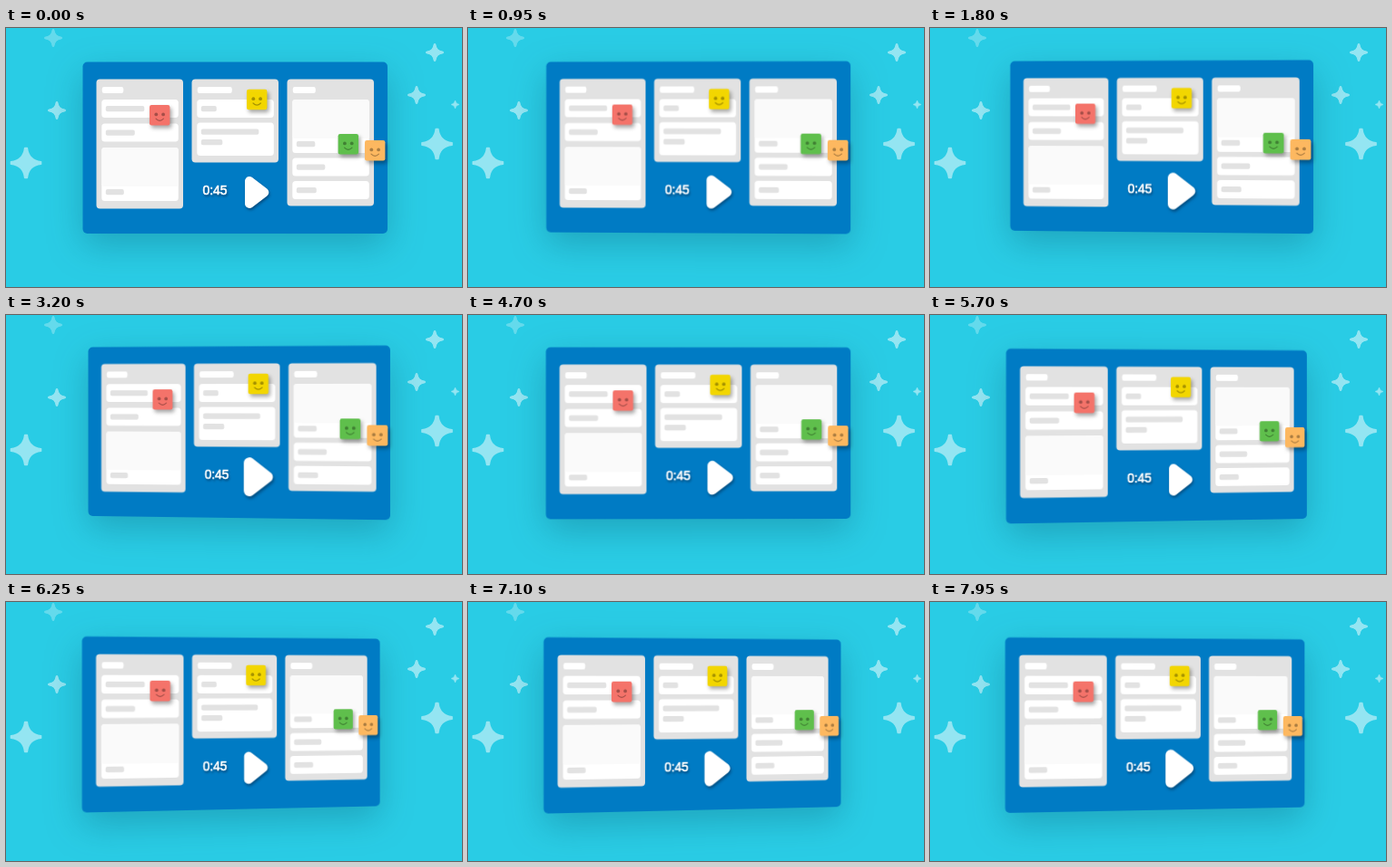
Write an HTML page that moves like this. It is 502x286 px and loops after 8000 ms.

```html
<!DOCTYPE html>
<html lang="en">
<head>
<meta charset="utf-8">
<title>Tilting board</title>
<style>
  html, body { margin: 0; width: 100%; height: 100%; overflow: hidden; background: #29cce5; }
  body { perspective: 1400px; perspective-origin: 252px 90px; }
  svg { position: absolute; left: 0; top: 0; width: 502px; height: 286px; overflow: visible; }
  #sky { fill: #fff; stroke: #fff; stroke-width: .1; stroke-linejoin: round; }
  #board { transform-origin: 252.25px 132.25px; }
  .base { fill: #007bc4; filter: drop-shadow(0 13px 19px rgba(0, 60, 80, .27)); }
  .panel, .pill { fill: #e2e2e2; }
  .card { fill: #fff; }
  .cover { fill: #fafafa; }
  .face { filter: drop-shadow(2px 3px 2px rgba(0, 0, 0, .35)); }
  .ink { fill: rgba(0, 0, 0, .32); }
  .smile { fill: none; stroke: rgba(0, 0, 0, .32); stroke-width: 1.1; stroke-linecap: round; }
  #play { fill: #fff; stroke: #fff; stroke-width: 10; stroke-linejoin: round;
          filter: drop-shadow(1.5px 2.5px 1.5px rgba(0, 30, 60, .5)); }
  text { font: 14px "Liberation Sans", Arial, sans-serif; fill: #fff; stroke: #fff; stroke-width: .6;
         filter: drop-shadow(1px 2px 1px rgba(0, 30, 60, .5)); }
</style>
</head>
<body>
<svg id="sky"></svg>
<svg id="board"></svg>
<script>
const LOOP = 8;
const sky = document.getElementById('sky');
const board = document.getElementById('board');

// --- Sky: stars fade out towards the top edge
const star = (x, y, r) =>
  `<path transform="translate(${x} ${y}) scale(${r})" opacity="${Math.min(.5, y / 40)}"
    d="M-.07-.94H.07Q.16-.16 .94-.07V.07Q.16 .16 .07 .94H-.07Q-.16 .16-.94 .07V-.07Q-.16-.16-.07-.94Z"/>`;

sky.innerHTML =
  star(22, 149, 17.5) + star(474.5, 128, 17.5) +
  star(56, 91, 10) + star(52, 11, 10) + star(452, 74, 10) + star(472, 27, 10) +
  star(494.5, 84.5, 4.5);

// --- Board
const box = (kind, x, y, w, h, r) =>
  `<rect class="${kind}" x="${x}" y="${y}" width="${w}" height="${h}" rx="${r}"/>`;

// Stacks cards down a column; each card lists the widths of its pills
function panel(column, gap, titleWidth, cards) {
  const x = 99.5 + 105 * column;
  let y = 79, content = box('card', x + 6.3, 65, titleWidth, 7, 2.2);
  for (const { cover = 0, pills } of cards) {
    const height = 20 + cover + 16.5 * (pills.length - 1);
    content += box('card', x + 5.8, y, 84.5, height, 3.5);
    if (cover) content += box('cover', x + 5.8, y, 84.5, cover + 4, 3);
    pills.forEach((width, i) => {
      content += box('pill', x + 10.3, y + cover + 7 + 11.5 * i, width, 6.2, 2);
    });
    y += height + gap;
  }
  return box('panel', x, 56.5, 95.5, y + 2 - 56.5, 4) + content;
}

const face = (x, y, color) =>
  `<g class="face" transform="translate(${x} ${y})">
    <rect width="22.4" height="22.4" rx="2.2" fill="${color}"/>
    <circle class="ink" cx="7.3" cy="10.4" r="1.9"/><circle class="ink" cx="15.1" cy="10.4" r="1.9"/>
    <path class="smile" d="M7 15.2Q11.2 19.4 15.4 15.2"/>
  </g>`;

board.innerHTML =
  box('base', 84.5, 37.5, 335.5, 189.5, 5) +
  panel(0, 6.5, 23.5, [{ pills: [42.5] }, { pills: [32] }, { cover: 39, pills: [20] }]) +
  panel(1, 5.5, 38, [{ pills: [17] }, { pills: [63.5, 23.5] }]) +
  panel(2, 5.5, 25, [{ cover: 39, pills: [20.5] }, { pills: [31.5] }, { pills: [22] }]) +
  '<text x="216.4" y="184">0:45</text>' +
  '<path id="play" d="M268 169V194L284.3 181.5Z"/>' +
  face(158, 85, '#f4736a') +
  face(265, 67.8, '#f2d600') +
  face(365.6, 117, '#5fbf4c') +
  face(395, 124, '#fdb860');

const play = document.getElementById('play');

// --- Motion: glides between [time, value] points with a cosine ease
function glide(t, ...points) {
  const next = points.findIndex(([time]) => time > t);
  const [t0, from] = points[next - 1], [t1, to] = points[next];
  const eased = (1 - Math.cos(Math.PI * (t - t0) / (t1 - t0))) / 2;
  return from + (to - from) * eased;
}

function draw(t) {
  const turn = glide(t, [-1.5, 2.5], [3.1, -8], [6.7, 13.2], [10.5, 4]);
  const dx = glide(t, [0, 0], [3.9, 1.9], [7.3, -1], [11, 0]);
  const dy = glide(t, [0, 0], [3.6, -3], [7.2, 2.8], [11, 2]);
  const pulse = 1 + .115 * (1 - Math.cos(2 * Math.PI * (t / 5.65 - .015)));
  board.style.transform = `translate(${dx}px, ${dy}px) rotateY(${turn}deg)`;
  play.setAttribute('transform', `translate(276 181.5) scale(${pulse}) translate(-276 -181.5)`);
}

const start = performance.now();
function tick() {
  draw((performance.now() - start) / 1000 % LOOP);
  requestAnimationFrame(tick);
}
tick();
</script>
</body>
</html>
```
